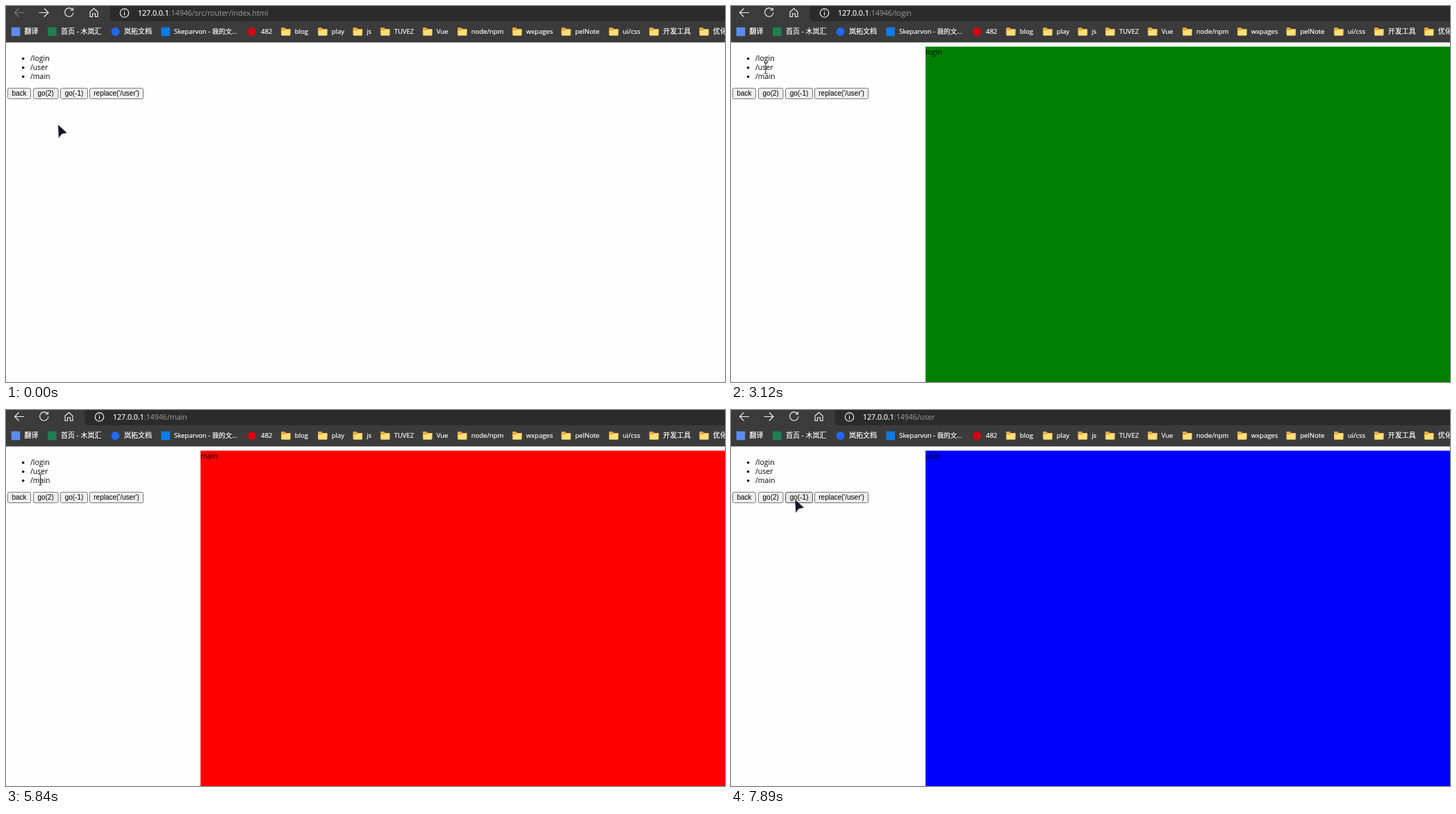
Recreate the animation shown at these times as an HTML page. Size 1035 px wide and 541 px high, loop 8000 ms.

```html
<!DOCTYPE html>
<html lang="zh">
<head>
<meta charset="utf-8">
<title>Router demo</title>
<style>
html, body { margin: 0; width: 100%; height: 100%; overflow: hidden; background: #fefefe; }
svg { display: block; }
text { white-space: pre; }
.ui { font-family: "Open Sans", "Noto Sans CJK SC", "Noto Sans CJK", sans-serif; }
.btn { font: 10px "Liberation Sans", Arial, sans-serif; }
.line { fill: none; stroke: #f2f2f2; stroke-width: 1.15; }
.bright { fill: #fff; stroke: #fff; stroke-width: .2; }
</style>
</head>
<body>
<svg id="stage" class="ui" width="1035" height="541" viewBox="0 0 1035 541">
  <rect width="1035" height="541" fill="#fefefe"/>
  <rect width="1035" height="52.4" fill="#3b3b3b"/>
  <path id="back" class="line" d="M26 9.5H12.5M18.5 3.5L12.5 9.5L18.5 15.5"/>
  <path id="forward" class="line" d="M47.5 9.5H61M55 3.5L61 9.5L55 15.5"/>
  <g id="tools">
    <path d="M149.5 0H1075V22H155Q149.5 22 149.5 17Z" fill="#2b2b2b"/>
    <path class="line" d="M95.5 5A6.2 6.2 0 1 0 97 9.5M96.5 2.5V6H92.5"/>
    <path class="line" d="M121 8.5L126.5 3.5L132 8.5V15.5H128.5V11H124.5V15.5H121Z"/>
    <circle class="line" cx="170.5" cy="10" r="6.2"/>
    <path class="line" d="M170.5 9V13.5M170.5 6.3V7.6"/>
    <text x="190" y="14" font-size="10.6"><tspan class="bright">127.0.0.1</tspan><tspan id="path" fill="#a0a0a0"></tspan></text>
  </g>
  <g id="marks"></g>
  <g id="list" font-size="10.5"></g>
  <g id="buttons" class="btn"></g>
  <g id="panel">
    <rect id="fill" x="280" y="58.5" width="755" height="483"/>
    <text id="name" x="280" y="69.5" font-size="10.5"></text>
  </g>
  <path id="arrow" d="M0 1L12.5 12.5L5.2 14L1 19.7Z" fill="#14142a" stroke="#c9c9dc" stroke-width=".7" paint-order="stroke"/>
  <path id="beam" d="M-2.5 -7.5H-.7L0 -7L.7 -7.5H2.5M0 -7V7M-2.5 7.5H-.7L0 7L.7 7.5H2.5" fill="none" stroke="#1c1c2c"/>
</svg>
<script>
const NS = "http://www.w3.org/2000/svg";
const $ = id => document.getElementById(id);

function add(parent, tag, attrs, text) {
  const el = document.createElementNS(NS, tag);
  for (const k in attrs) el.setAttribute(k, attrs[k]);
  if (text) el.textContent = text;
  parent.appendChild(el);
  return el;
}

// Bookmarks: icon centre, label x, label, icon colour, round icon
const sites = [
  [14, 26.5, "翻译", "#5b8def"],
  [66.3, 79, "首页 - 木岚汇", "#1f7f52"],
  [157.5, 170, "岚拓文档", "#2468f2", true],
  [229.7, 242, "Skeparvon - 我的文...", "#0f7be6"],
  [354, 367, "482", "#d8000f", true]
];
const folders = [
  [396, "blog"], [449, "play"], [499.5, "js"], [539, "TUVEZ"], [600, "Vue"],
  [650, "node/npm"], [729, "wxpages"], [799.5, "pelNote"], [868, "ui/css"],
  [926, "开发工具"], [998, "优化"]
];
const marks = $("marks");
const label = (x, s) => add(marks, "text",
  { x, y: 40.3, class: "bright", "font-size": /^[a-z0-9]/i.test(s) ? 9.5 : 10 }, s);

for (const [cx, x, s, fill, round] of sites) {
  if (round) add(marks, "circle", { cx, cy: 37, r: 6, fill });
  else add(marks, "rect", { x: cx - 6.3, y: 30.7, width: 12.6, height: 12.6, fill });
  label(x, s);
}
for (const [x, s] of folders) {
  add(marks, "path", { d: `M${x} 32q0-1 1-1h4l2 2h5.500q1 0 1 1v3h-13.500Z`, fill: "#e9a93a" });
  add(marks, "path", {
    d: `M${x + .3} 35h5l2-1.500h6v8q0 1-1 1h-11q-1 0-1-1Z`,
    fill: "#ffdf7c", stroke: "#dfa93c", "stroke-width": .6
  });
  label(x + 19.7, s);
}

["/login", "/user", "/main"].forEach((s, i) => {
  add($("list"), "circle", { cx: 24.7, cy: 75.8 + 13 * i, r: 1.8 });
  add($("list"), "text", { x: 35, y: 79 + 13 * i }, s);
});

const buttons = [
  [2.5, 33, "back"], [39.5, 35.5, "go(2)"], [78.5, 39, "go(-1)"], [120.5, 77, "replace('/user')"]
].map(([x, width, s]) => {
  const box = add($("buttons"), "rect", { x, y: 118.3, width, height: 15.2, rx: 2 });
  add($("buttons"), "text", { x: x + width / 2, y: 129.2, "text-anchor": "middle" }, s);
  return box;
});
const looks = {
  rest: ["#efefef", "#767676"],
  hover: ["#e5e5e5", "#4f4f4f"],
  press: ["#f5f5f5", "#8d8d8d"]
};

// Routes: start, path, panel colour, can go back, can go forward
const routes = [
  [0, "/src/router/index.html", "", false, true],
  [1700, "/login", "#008000", true, false],
  [3640, "/user", "#0000ff", true, false],
  [5840, "/main", "#ff0000", true, false],
  [7890, "/user", "#0000ff", true, true]
];

// Pointer: start, x, y, kind, hovered button
const moves = [
  [0, 75, 170, "arrow"], [500, 60.5, 161, "arrow"], [650, 46.5, 149, "arrow"],
  [800, 47, 122, "arrow", 1], [930, 49.5, 89, "beam"], [1060, 49.5, 75, "beam"],
  [1570, 48, 73, "arrow"], [1700, 49.5, 75, "beam"],
  ...[2610, 2740, 2870, 2990, 3120].map((t, i) => [t, 50, 78 + 2.9 * i, "beam"]),
  [4430, 50, 93, "beam"], [4560, 50, 99, "beam"], [4690, 49.5, 96, "beam"],
  [5070, 49.5, 100.3, "beam"],
  [6220, 46, 102, "beam"], [6350, 38, 105, "beam"], [6480, 30, 109, "arrow"],
  [6600, 33, 112, "arrow"], [6710, 36, 115, "arrow"],
  [6960, 34, 117, "arrow", 0], [7110, 46, 119, "arrow", 1],
  [7260, 70, 125, "arrow", 1], [7390, 92.3, 128, "arrow", 2]
];

const at = (steps, t) => steps.findLast(s => s[0] <= t);
const show = (id, on) => $(id).setAttribute("visibility", on ? "visible" : "hidden");

function draw(t) {
  const [, path, colour, canBack, canForward] = at(routes, t);
  $("path").textContent = ":14946" + path;
  $("back").style.stroke = canBack ? "#f2f2f2" : "#7c7c7c";
  show("forward", canForward);
  $("tools").setAttribute("transform", `translate(${canForward ? 0 : -36})`);
  show("panel", colour);
  $("fill").setAttribute("fill", colour || "none");
  $("name").textContent = path.slice(1);

  const [, x, y, kind, over] = at(moves, t);
  for (const id of ["arrow", "beam"]) {
    show(id, id === kind);
    $(id).setAttribute("transform", `translate(${x} ${y})`);
  }
  const pressed = t >= 7640 && t < 7890;
  buttons.forEach((box, i) => {
    const [fill, stroke] = looks[i !== over ? "rest" : pressed ? "press" : "hover"];
    box.setAttribute("fill", fill);
    box.setAttribute("stroke", stroke);
  });
}

const start = performance.now();
function tick() {
  draw((performance.now() - start) % 8000);
  requestAnimationFrame(tick);
}
tick();
</script>
</body>
</html>
```
